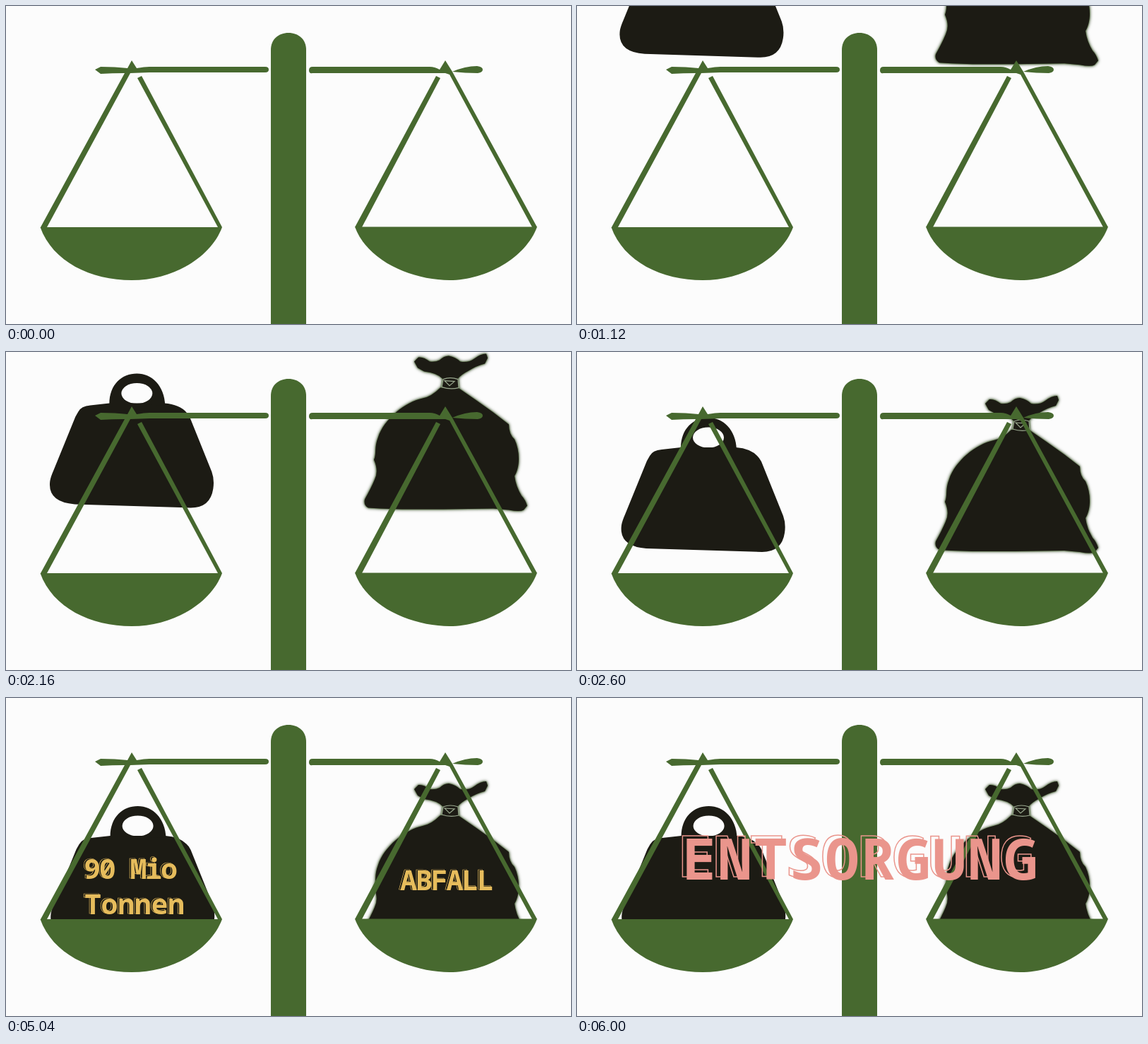
An HTML page that plays this animation: 800x450 px, repeating every 7040 ms.

```html
<!DOCTYPE html>
<html lang="de">
<head>
<meta charset="utf-8">
<title>Waage</title>
<style>
  html, body { margin: 0; width: 100%; height: 100%; overflow: hidden; background: #fcfcfc; }
  svg { display: block; width: 100vw; height: 100vh; }
  text { font-family: "Noto Sans Mono", "DejaVu Sans Mono", monospace; font-weight: 700; }
  .load { fill: #1c1b14; }
  #bag { filter: drop-shadow(0 0 1px #47692f) drop-shadow(0 0 2px #3d4f30); }
  #scale { fill: #47692f; }
  #amount { color: #e6bc5c; }
  #topic { color: #ea958c; }
  .face { fill: currentColor; }
  .edge { fill: none; stroke: currentColor; }
</style>
</head>
<body>
<svg viewBox="0 0 800 450">
  <clipPath id="abovePans"><path d="M0 0H800V314H0Z"/></clipPath>

  <g clip-path="url(#abovePans)">
    <g id="weight" class="load">
      <path d="M103 147Q107 139 120 138L147 135H225Q252 137 261 155L292 232Q296 243 294 256Q290 283 262 283L98 278Q59 275 63 245Q64 239 68 230L99 154Z"/>
      <path fill-rule="evenodd" d="M147 136C147 108 165 93 186 93S225 110 226 138ZM164 121a22 14.5 0 0 0 44 0a22 14.5 0 0 0 -44 0Z"/>
    </g>
    <g id="bag" class="load">
      <path d="M508 268Q506 276 513 280L530 281L560 282L620 282L690 281L712 283Q728 286 733 283L738 277Q735 268 730 263Q722 250 720 235C728 222 728 200 720 183Q712 176 712 162L690 145Q665 127 640 110H615Q602 123 590 125C565 130 535 155 527 180C521 195 525 203 521 212Q528 228 522 240Q517 252 508 268Z"/>
      <path d="M578 73L584 67Q591 66 600 73Q608 74 614 71Q620 65 627 65Q637 67 643 73Q655 75 663 69Q672 62 680 62L682 68L678 76Q666 79 655 86Q645 91 639 98H619Q611 89 592 87L583 82Z"/>
      <path d="M619 98Q629 94 640 98L641 110Q629 113 617 109ZM621 100L635 101L628 107Z" stroke="#9aa88f" stroke-width="1.2"/>
    </g>
  </g>

  <g id="scale">
    <path d="M375 450V62C375 47 386 38 400 38S425 47 425 62V450Z"/>
    <path d="M126 90L134 86Q155 86 172 88L178 77L185 88Q196 86 203 86H367Q372 86 372 90T367 94H203L176 95L58 313H49L168 95Q150 95 134 96Z"/>
    <path d="M186 102L192 99L306 313H300Z"/>
    <path d="M434 86H600Q607 86 614 90L622 77L632 93Q650 85 667 85Q675 86 675 90T668 95Q650 95 632 93L752 313H745L628 97L622 95H434Q429 96 429 91T434 86Z"/>
    <path d="M609 99L615 102L504 313H494Z"/>
    <path d="M48.500 313H306C290 356 236 388 178 388S66 362 48.500 313Z"/>
    <path d="M494 312.500H752C736 356 680 388 628 388S512 362 494 312.500Z"/>
  </g>

  <g id="amount"></g>
  <g id="topic"></g>
</svg>
<script>
const el = id => document.getElementById(id);
const clamp = x => Math.max(0, Math.min(1, x));

// Solid letters with a thin outlined copy set off to the upper left
function label(text, x, y, size, spacing, dx, dy, line) {
  const layer = (cls, lx, ly) =>
    `<text class="${cls}" x="${lx}" y="${ly}" font-size="${size}" letter-spacing="${spacing}" stroke-width="${line}">${text}</text>`;
  return layer("edge", x + dx, y + dy) + layer("face", x, y);
}

el("amount").innerHTML =
  label("90 Mio", 110, 256, 40, -2.2, -2, -1.5, 0.7) +
  label("Tonnen", 111, 306, 40, -0.4, -2, -1.5, 0.7) +
  label("ABFALL", 558, 272, 40, -2.2, -2, -1.5, 0.7);
el("topic").innerHTML = label("ENTSORGUNG", 149, 257, 80, 2.6, -6, -4, 1.5);

const LOOP = 7040, STEP = 40;

function draw(now) {
  const t = Math.floor(now % LOOP / STEP) * STEP;

  // Both loads sink steadily and come to rest at 3000 ms
  const p = Math.min(1, (t - 2600) / 400);
  const sink = (before, after) => p * (p < 0 ? before : after);
  el("weight").setAttribute("transform", `translate(${0.6 * p} ${sink(56.8, 60)})`);
  el("bag").setAttribute("transform", `translate(0 ${sink(54, 56)})`);

  const fade = clamp((t - 5040) / 960);
  el("amount").style.opacity = t < 3480 ? 0 : 1 - fade;
  el("topic").style.opacity = fade;
}

const start = performance.now();
function tick() {
  draw(performance.now() - start);
  requestAnimationFrame(tick);
}
tick();
</script>
</body>
</html>
```
